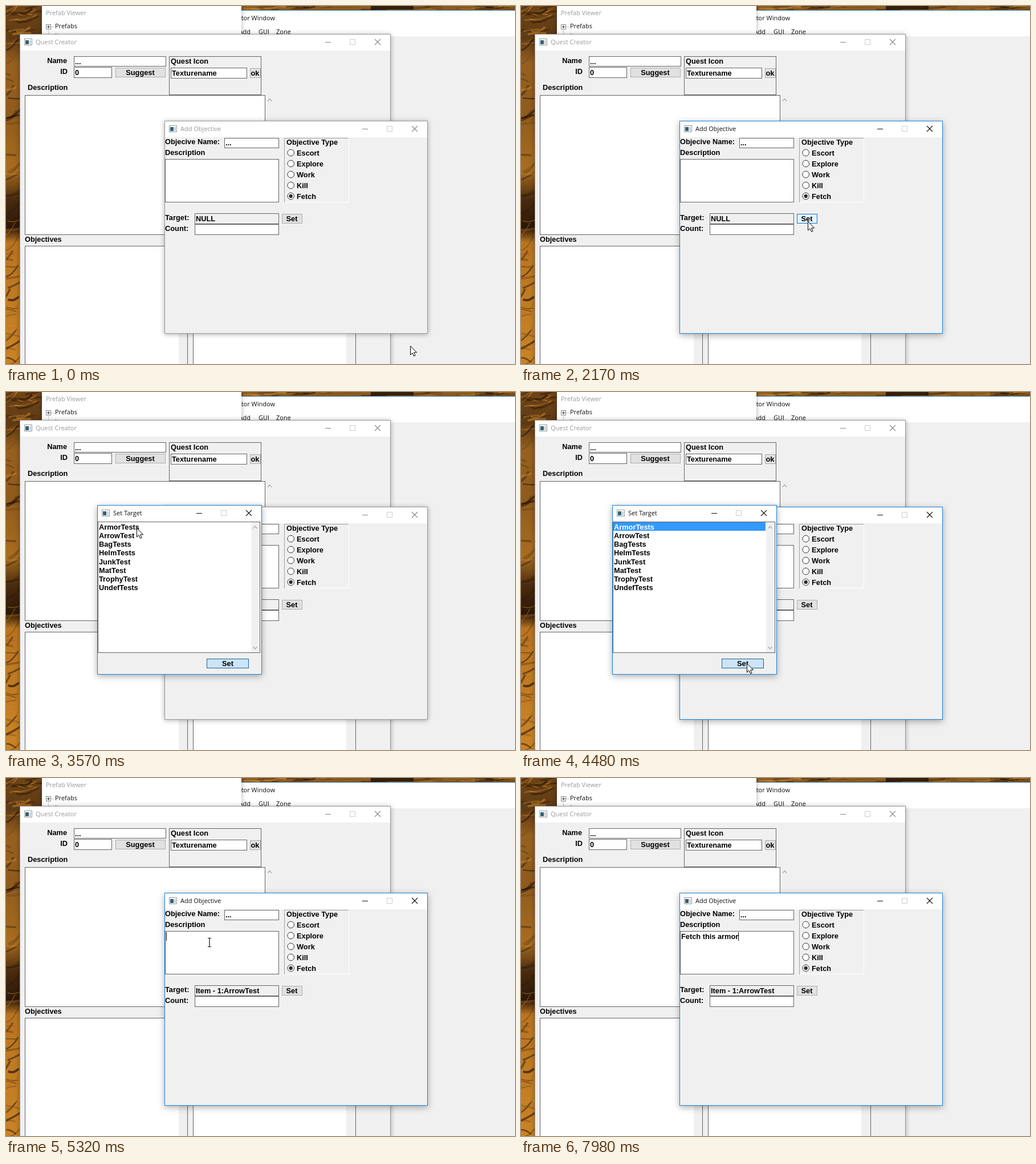
Recreate the animation shown at these times as an HTML page. Size 893 by 627 pixels, loop 8000 ms.

```html
<!DOCTYPE html>
<html lang="en">
<head>
<meta charset="utf-8">
<title>Quest editor</title>
<style>
html, body { margin: 0; width: 100%; height: 100%; overflow: hidden; background: #f0f0f0; }
svg { display: block; width: 893px; height: 627px; }
text { font: bold 12.8px "Liberation Sans", Arial, sans-serif; white-space: pre; }
text.ui { font: 11px "Open Sans", "Noto Sans", sans-serif; }
.wide { filter: drop-shadow(0 3px 6px rgba(0,0,0,.32)); }
.thin { filter: drop-shadow(0 1px 4px rgba(0,0,0,.32)); }
</style>
</head>
<body>
<svg id="stage" viewBox="0 0 893 627" xmlns="http://www.w3.org/2000/svg"></svg>
<script>
const LOOP = 8000, STEP = 70;
const FACE = '#f0f0f0', LINE = '#646464', BLUE = '#1883d7';
const ITEMS = ['ArmorTests', 'ArrowTest', 'BagTests', 'HelmTests', 'JunkTest', 'MatTest', 'TrophyTest', 'UndefTests'];
const TYPES = ['Escort', 'Explore', 'Work', 'Kill', 'Fetch'];
const NOTE = 'Fetch this armor';

// time, x, y of the pointer
const PATH = [
  [0, 709, 595], [300, 709, 595], [800, 690, 560], [1400, 590, 450], [2000, 506, 380],
  [2170, 503, 377], [2520, 512, 373], [2730, 514, 372], [2800, 514, 372], [3500, 230, 238],
  [3800, 225, 237], [4270, 392, 472], [4480, 396, 475], [4690, 396, 473], [5100, 357, 288]
];
const WAKE = 1400, HOVER = 1960, OPEN = 2590, LEAVE = 2870, PICK = 3640,
      CLOSE = 4480, CLICK = 5180, TYPE = 6230, KEY = 112, BLINK = 530;

const fill = (x, y, w, h, c, extra = '') => `<rect x="${x}" y="${y}" width="${w}" height="${h}" fill="${c}" ${extra}/>`;
const box = (x, y, x2, y2, c = '#fff', line = LINE, extra = '') =>
  fill(x + .5, y + .5, x2 - x, y2 - y, c, `stroke="${line}" ${extra}`);
const text = (x, y, s, extra = '') => `<text x="${x}" y="${y}" ${extra}>${s}</text>`;
const ui = (x, y, s, c = '#111', extra = '') => text(x, y, s, `class="ui" fill="${c}" ${extra}`);
const path = (d, c, extra = '') => `<path d="${d}" fill="none" stroke="${c}" ${extra}/>`;
const group = (id, s) => `<g id="${id}">${s}</g>`;
const button = (x, y, x2, y2, label, id = '') =>
  box(x, y, x2, y2, '#e1e1e1', '#adadad', id && `id="${id}"`) + text((x + x2) / 2, y + 13, label, 'text-anchor="middle"');
const chevron = (x, y, dir) => path(`M${x - 3.5} ${y + 2 * dir}l3.5 ${-4 * dir}l3.5 ${4 * dir}`, '#aaa', 'stroke-width="1.3"');

function chrome(x, y, x2, y2, title, active) {
  const ink = active ? '#111' : '#888', cy = y + 14, r = x2 - 22;
  return fill(x, y, x2 - x + 1, y2 - y + 1, FACE, `class="${active ? 'wide' : 'thin'}"`) +
    fill(x, y, x2 - x, 29, '#fff') +
    box(x, y, x2, y2, 'none', active ? BLUE : '#999') +
    box(x + 8, y + 8, x + 21, y + 19, '#fff', '#999') +
    fill(x + 10, y + 11, 6, 7, '#2f6276') + fill(x + 17, y + 11, 3, 7, '#c5d0d6') +
    ui(x + 28, y + 18, title, active ? '#111' : '#999') +
    path(`M${r - 92} ${cy + .5}h10`, ink) +
    path(`M${r - 48.5} ${cy - 4.5}h9v9h-9z`, '#ccc') +
    path(`M${r - 5} ${cy - 5}l10 10m0 -10l-10 10`, ink, 'stroke-width="1.1"');
}

function wood() {
  let seed = 41;
  const rnd = (a = 1, b = 0) => {
    seed = (seed * 16807) % 2147483647;
    return b + (a - b) * seed / 2147483647;
  };
  const hues = ['#24130a', '#c8862c', '#3d220b', '#7c4c17'];
  const stops = [[0, '#6e4417'], [9, '#5e3a14'], [16, '#96601f'], [30, '#8f5a1d'], [46, '#a96d20'],
    [54, '#4a2b0e'], [62, '#2b1808'], [66, '#b87420'], [100, '#c98324']];
  // long grain lines leaning upward to the right
  const grain = (n, x, y, len, rise, bend) => {
    let s = '';
    for (let i = 0; i < n; i++) {
      const l = rnd(len, len / 2), up = rnd(rise, -rise / 3);
      s += path(`M${rnd(x[1], x[0])} ${rnd(y[1], y[0])}q${l / 2} ${rnd(bend, -bend)} ${l} ${-up}`,
        hues[i % hues.length], `stroke-width="${rnd(4, 1)}" opacity="${rnd(.7, .35)}"`);
    }
    return s;
  };
  return `<defs><linearGradient id="grain" x2="0" y2="1">${stops.map(([o, c]) =>
    `<stop offset="${o}%" stop-color="${c}"/>`).join('')}</linearGradient></defs>` +
    fill(0, 0, 64, 627, 'url(#grain)') + fill(413, 0, 480, 8, '#8a5c22') +
    grain(64, [-12, 4], [-5, 640], 38, 26, 6) +
    grain(28, [-15, 50], [0, 50], 40, 10, 5) +
    grain(36, [410, 890], [0, 7], 36, 4, 2) +
    fill(640, 0, 75, 6, '#1d1209', 'opacity=".8"');
}

const backdrop = () => wood() +
  fill(413, 7, 480, 620, FACE) + fill(413, 8, 480, 45, '#fff') + fill(413, 7, 480, 1, '#2b6f9f') +
  ui(472, 25, 'Editor Window', '#111', 'text-anchor="end"') +
  ui(429, 49, 'Add', '#111', 'text-anchor="end"') + ui(443, 49, 'GUI') + ui(474, 49, 'Zone') +
  fill(63, -5, 350, 70, '#fff', 'class="thin"') + ui(70, 16, 'Prefab Viewer', '#999') +
  box(70, 32, 78, 40, '#fff', '#888') + path('M72 36.5h5m-2.5 -2.5v5', '#333') +
  path('M79 36.5h5M74.5 42v8', '#999', 'stroke-dasharray="1 1"') +
  ui(86, 39, 'Prefabs') + ui(86, 56, 'Items');

const creator = () => chrome(24, 49, 674, 660, 'Quest Creator', false) +
  text(107, 100, 'Name', 'text-anchor="end"') + text(108, 119, 'ID', 'text-anchor="end"') +
  box(119, 88, 280, 105) + text(121, 102, '...') +
  box(119, 107, 185, 125) + text(121, 121, '0') + button(192, 108, 279, 124, 'Suggest') +
  box(286, 88, 447, 155, FACE) + text(289, 101, 'Quest Icon') +
  box(289, 108, 422, 126) + text(291, 122, 'Texturename') + button(428, 109, 446, 125, 'ok') +
  text(38, 147, 'Description') + box(33, 156, 454, 400) + chevron(462.5, 164.5, 1) +
  text(33, 413, 'Objectives') +
  box(33, 420, 318, 640) + fill(303, 421, 15, 206, FACE) +
  box(328, 420, 613, 640) + fill(597, 421, 16, 206, FACE);

const objective = () =>
  group('idle', chrome(278, 201, 739, 573, 'Add Objective', false)) +
  group('awake', chrome(278, 201, 739, 573, 'Add Objective', true)) +
  text(279, 242, 'Objecive Name:') + box(383, 231, 478, 248) + text(385, 244, '...') +
  text(279, 261, 'Description') + box(279, 268, 478, 343) +
  text(281, 282, '', 'id="note"') + fill(281, 270, 1, 15, '#000', 'id="caret"') +
  path('M488.5 344V231.5H602', '#a0a0a0') + path('M489 343.5H601.5V231', '#fff') +
  text(492, 243, 'Objective Type') +
  TYPES.map((name, i) => {
    const y = 257 + 19 * i;
    return `<circle cx="499.7" cy="${y}" r="5.8" fill="#fff" stroke="#333"/>` + text(510, y + 5, name);
  }).join('') + '<circle cx="499.7" cy="333" r="3.2" fill="#332a2a"/>' +
  text(279, 375, 'Target:') + box(331, 363, 478, 381, FACE) + text(333, 377, '', 'id="target"') +
  text(279, 394, 'Count:') + box(331, 382, 478, 400) +
  button(484, 364, 519, 380, 'Set', 'set');

const dialog = () => chrome(160, 198, 448, 494, 'Set Target', true) +
  box(161, 227, 445, 456) + fill(430, 228, 15, 228, FACE) +
  chevron(437, 237, 1) + chevron(437, 448, -1) +
  fill(162, 228, 267, 15, '#39f', 'id="pick"') +
  ITEMS.map((name, i) => text(163, 241 + Math.round(15.15 * i), name, i ? '' : 'id="first"')).join('') +
  box(352, 467, 425, 483, '#cce4f7', '#1d6297') + text(389, 480, 'Set', 'text-anchor="middle"');

const pointer = () =>
  group('arrow', '<path d="M.5 .5V16l3.6-3.3 2.5 5.6 2.4-1.1-2.4-5.4h5z" fill="#fff" stroke="#000"/>') +
  group('beam', path('M-3 -7.5h2.5q.5 0 .5 1v13q0 1 -.5 1h-2.5M3 -7.5h-2.5q-.5 0 -.5 1M0 6.5q0 1 .5 1h2.5', '#111', 'stroke-width="1.2"'));

document.getElementById('stage').innerHTML =
  backdrop() + creator() + objective() + group('dialog', dialog()) + group('pointer', pointer());

const el = {};
document.querySelectorAll('[id]').forEach(node => el[node.id] = node);
const show = (node, on) => node.setAttribute('visibility', on ? 'visible' : 'hidden');
const put = (node, s) => { if (node.textContent !== s) node.textContent = s; };

function pointerAt(t) {
  const i = PATH.findIndex(p => p[0] > t);
  if (i < 0) return PATH[PATH.length - 1].slice(1);
  const [t0, x0, y0] = PATH[i - 1], [t1, x1, y1] = PATH[i];
  const k = (t - t0) / (t1 - t0), e = k * k * (3 - 2 * k);
  return [x0 + (x1 - x0) * e, y0 + (y1 - y0) * e].map(Math.round);
}

function draw(now) {
  const t = Math.floor(now % LOOP / STEP) * STEP;
  const awake = t >= WAKE && t < OPEN || t >= CLOSE;
  show(el.idle, !awake);
  show(el.awake, awake);

  const hover = t >= HOVER && t < LEAVE;
  el.set.setAttribute('fill', !hover ? '#e1e1e1' : t < OPEN ? '#e5f1fb' : '#cce4f7');
  el.set.setAttribute('stroke', hover ? '#0078d7' : '#adadad');

  const fade = t < OPEN ? 0 : Math.min(1, Math.max(0, 1 - (t - CLOSE) / 180));
  el.dialog.setAttribute('opacity', fade);
  show(el.dialog, fade > 0);
  el.pick.setAttribute('opacity', t >= PICK ? 1 : 0);
  el.first.setAttribute('fill', t >= PICK ? '#fff' : '#000');
  put(el.target, t < CLOSE ? 'NULL' : 'Item - 1:ArrowTest');

  const typed = NOTE.slice(0, Math.max(0, Math.floor((t - TYPE) / KEY) + 1));
  put(el.note, typed);
  el.caret.setAttribute('x', Math.round(281 + (typed ? el.note.getComputedTextLength() : 0)));
  show(el.caret, t >= CLICK && (typed || Math.floor((t - CLICK) / BLINK) % 2 === 0));

  const [x, y] = pointerAt(t);
  const overNote = t > CLOSE + 180 && x < 478 && y > 268 && y < 344;
  el.pointer.setAttribute('transform', `translate(${x} ${y})`);
  show(el.arrow, !overNote);
  show(el.beam, overNote && t < TYPE);
}

const start = performance.now();
function tick() {
  draw(performance.now() - start);
  requestAnimationFrame(tick);
}
tick();
</script>
</body>
</html>
```
